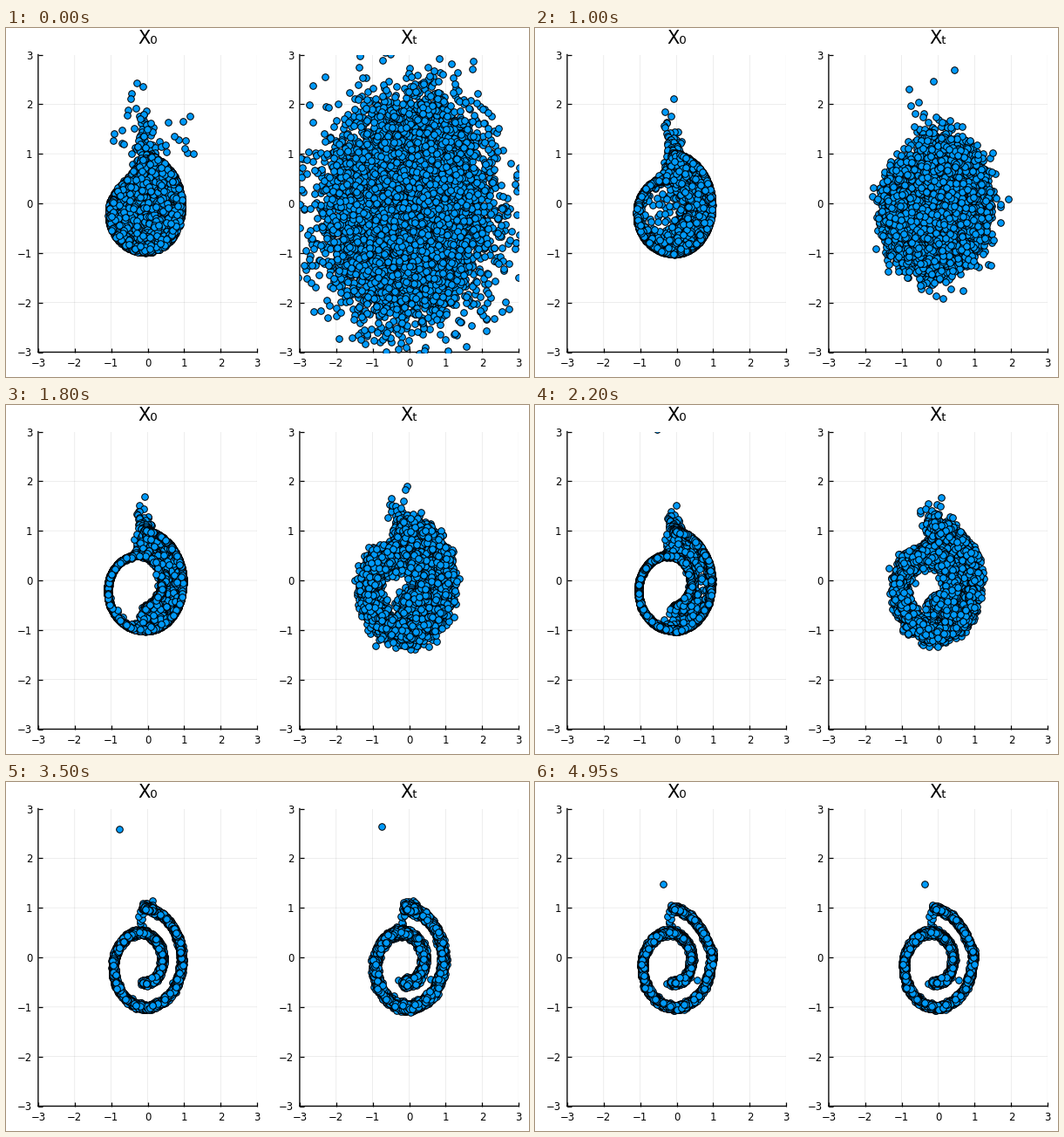
A matplotlib script for the animation above (5000 ms loop, 600x400 px).

```python
import numpy as np
import matplotlib.pyplot as plt
from matplotlib.animation import FuncAnimation

W, H, DPI = 600, 400, 100
FRAMES, INTERVAL = 100, 50
N, TAIL, LOOSE = 7500, 70, 24
PX = 72 / DPI  # points per pixel

rng = np.random.default_rng(7)


def spiral(t):
    """Swiss roll fitted into the unit box."""
    x = 0.93 * (t * np.cos(t) - np.pi / 2) / (3.5 * np.pi)
    y = (t * np.sin(t) - np.pi / 2) / (4 * np.pi)
    return np.stack([x, y], axis=-1)


# Schedules over the loop, given at a few key steps
KEYS = [0, 12, 28, 44, 59, 83, 99]
steps = np.arange(FRAMES)


def schedule(values, log=False):
    if log:
        return np.exp(np.interp(steps, KEYS, np.log(values)))
    return np.interp(steps, KEYS, values)


def ramp(start, end):
    s = np.clip((steps - start) / (end - start), 0, 1)
    return s * s * (3 - 2 * s)


sigma = schedule([0.81, 0.37, 0.17, 0.095, 0.06, 0.012, 0.002], log=True)
width = schedule([0.48, 0.25, 0.21, 0.165, 0.085, 0.05, 0.05], log=True)
height = schedule([0.36, 0.27, 0.18, 0.11, 0.06, 0, 0])
settle = ramp(62, 82)
swell = 1 - ramp(35, 60)
flatten = ramp(83, 99)
scatter = np.clip(1 - steps / 8, 0, 1)

# Resting places of the points
angle = np.pi * (1.5 + 3 * rng.random(N))
angle[:TAIL] = np.pi * rng.uniform(4.4, 4.5, TAIL)
grain = 0.025 * rng.standard_normal((N, 2))
home = spiral(angle) + grain
home[TAIL - 8:TAIL, 0] = rng.uniform(-0.26, -0.12, 8)
home[TAIL - 8:TAIL, 1] = np.linspace(0.58, 0.93, 8)
home[TAIL] = 0.56, -0.47
home[TAIL + 1] = -0.27, -0.52
home[TAIL + 2] = -0.15, -0.6
rise = -np.log((np.arange(TAIL) + 0.5) / TAIL)
loose = np.stack([rng.uniform(-1.2, 1.3, LOOSE),
                  1.0 + 0.8 * rng.random(LOOSE) ** 1.7], axis=1)
nodes = spiral(np.pi * np.linspace(1.5, 4.5, 120))

# Late change of the outer arm
arm = np.clip((angle / np.pi - 3.95) / 0.55, 0, 1)
bend = -0.05 * np.sin(np.pi * arm)[:, None] * home
bend[:, 0] += 0.06 * np.exp(-((angle / np.pi - 4.06) / 0.05) ** 2)

# One stray point that comes in from above
STRAY = [34, 44, 59, 66, 77, 83, 88, 99]
stray_x = np.interp(steps, STRAY,
                    [-0.45, -0.55, -0.82, -0.8, -0.75, -0.72, -0.61, -0.38])
stray_y = np.interp(steps, STRAY,
                    [3.3, 3.04, 2.78, 2.66, 2.44, 2.22, 1.99, 1.47])
stray_lag = np.interp(steps, [44, 59, 66, 77], [0.5, 0.24, 0.1, 0])


def swollen(points, s):
    """Widen the shape, most of all to the left."""
    x, y = points.T
    x = x * (1 + s * np.where(x < 0, 0.2, 0.06))
    return np.stack([x, y * (1 + 0.03 * s)], axis=1)


def denoise(points, centres, h):
    """Mean of the centres weighted by a Gaussian around each point."""
    points, centres = points.astype("f4"), centres.astype("f4")
    score = points @ centres.T - 0.5 * (centres ** 2).sum(axis=1)
    score -= score.max(axis=1, keepdims=True)
    score *= np.float32(1 / h ** 2)
    weight = np.exp(score, out=score)
    return weight @ centres / weight.sum(axis=1, keepdims=True)


def simulate():
    clean, noisy = [], []
    z = rng.standard_normal((N, 2))
    keep = 0.953
    for k in range(FRAMES):
        xt = swollen(home, swell[k]) + flatten[k] * bend + sigma[k] * z
        if settle[k] < 1:
            x0 = denoise(xt, swollen(nodes, swell[k]), width[k])
            x0 = x0 + (0.2 + 0.6 * (1 - swell[k])) * grain
            x0 += settle[k] * (xt - x0)
        else:
            x0 = xt.copy()

        lift = height[k] * rise[:, None] * np.array([-0.2, 1])
        blur = min(0.5 * sigma[k] ** 2, 0.14)
        x0[:TAIL] = home[:TAIL] + blur * z[:TAIL] + lift
        x0[:TAIL, 0] -= 0.1 * swell[k]
        xt[:TAIL] += 1.3 * lift
        xt[:TAIL, 0] -= 0.2 * swell[k]
        part = slice(TAIL, TAIL + LOOSE)
        x0[part] += scatter[k] * (loose - x0[part])

        x0[-1] = stray_x[k], stray_y[k]
        xt[-1] = stray_x[k] + 0.4 * stray_lag[k], stray_y[k] + stray_lag[k]
        clean.append(x0)
        noisy.append(xt)
        z = keep * z + np.sqrt(1 - keep ** 2) * rng.standard_normal((N, 2))
    return clean, noisy


clean, noisy = simulate()

plt.rcParams["font.family"] = "DejaVu Sans"
fig = plt.figure(figsize=(W / DPI, H / DPI), dpi=DPI, facecolor="white")


def panel(left, title):
    ax = fig.add_axes([left / W, 28.5 / H, 251.3 / W, 341 / H])
    ax.set(xlim=(-3, 3), ylim=(-3, 3),
           xticks=range(-3, 4), yticks=range(-3, 4))
    ax.set_axisbelow(True)
    ax.grid(color="black", alpha=0.1, linewidth=0.5, snap=False)
    ax.tick_params(direction="in", length=5 * PX, width=0.9,
                   pad=6.6 * PX, labelsize=8.4)
    for side in ("top", "right"):
        ax.spines[side].set_visible(False)
    for side in ("left", "bottom"):
        ax.spines[side].set(linewidth=0.95, zorder=1, snap=False)
    fig.text((left + 125.9) / W, 1 - 18.2 / H, title, fontsize=15,
             ha="center", va="baseline")
    dots, = ax.plot([], [], "o", markersize=7.6 * PX, color="#009AFA",
                    markeredgecolor="black", markeredgewidth=PX, zorder=3)
    return dots


dots_0 = panel(36.9, "X₀")
dots_t = panel(336.9, "Xₜ")


def draw(k):
    dots_0.set_data(*clean[k].T)
    dots_t.set_data(*noisy[k].T)
    return dots_0, dots_t


anim = FuncAnimation(fig, draw, frames=FRAMES, interval=INTERVAL,
                     init_func=lambda: draw(0), repeat=True, repeat_delay=0)
plt.show()
```
